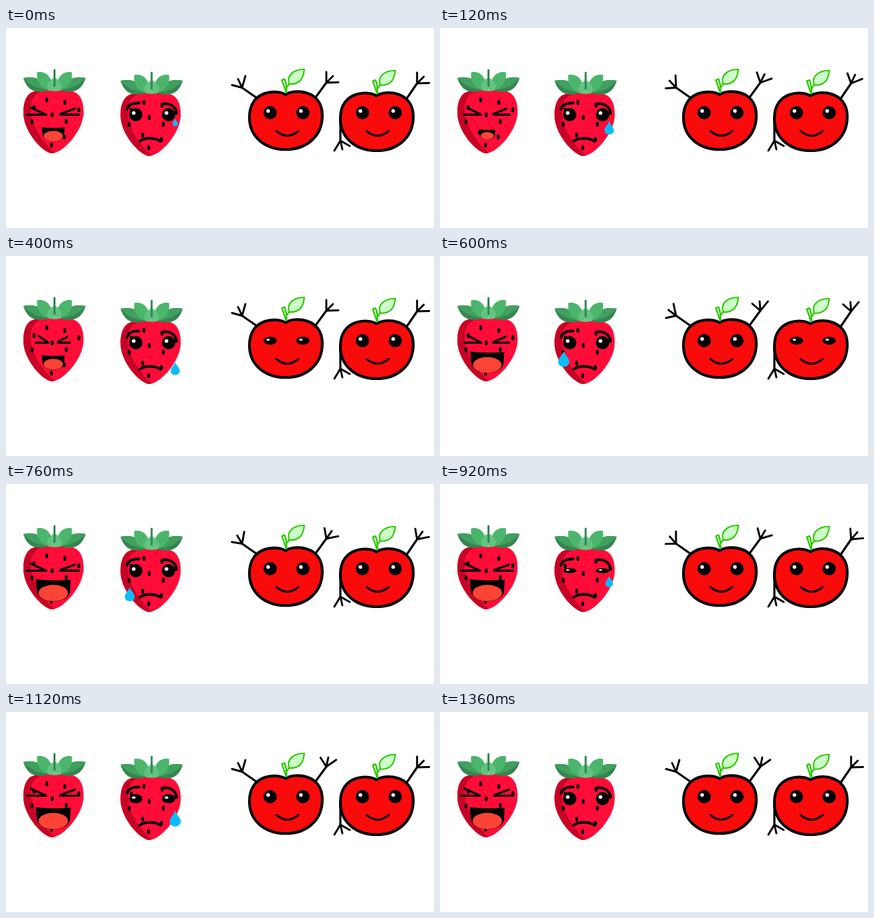
Animation of 640 by 300 pixels, one loop 1.4 s. Source, as an HTML page with a canvas:

```html
<!DOCTYPE html>
<html lang="en">
<head>
<meta charset="utf-8">
<title>Fruit faces</title>
<style>
html, body { margin: 0; width: 100%; height: 100%; overflow: hidden; background: #fff; }
canvas { display: block; }
</style>
</head>
<body>
<canvas id="stage" width="640" height="300"></canvas>
<script>
const ctx = document.getElementById('stage').getContext('2d');
const LOOP = 1400, STEP = 40;
ctx.lineCap = ctx.lineJoin = 'round';

// Rises from 0 to 1 between two times.
const ramp = (t, from, to) => Math.min(1, Math.max(0, (t - from) / (to - from)));
// Rises to 1 at the peak and falls back to 0.
const pulse = (t, peak, half) => Math.max(0, 1 - Math.abs(t - peak) / half);
// Three swings of a hand, in degrees.
const swing = (t, first, second, third) =>
  -first * pulse(t, 200, 200) - second * pulse(t, 600, 200) - third * pulse(t, 960, 160);
const blink = (t, peak) => 1 - .6 * pulse(t, peak, 120);

function at(x, y, draw, sx = 1, sy = sx, degrees = 0) {
  ctx.save();
  ctx.translate(x, y);
  ctx.rotate(degrees * Math.PI / 180);
  ctx.scale(sx, sy);
  draw();
  ctx.restore();
}

function shape(d, fill, stroke, width) {
  const path = new Path2D(d);
  if (fill) { ctx.fillStyle = fill; ctx.fill(path); }
  if (stroke) { ctx.strokeStyle = stroke; ctx.lineWidth = width; ctx.stroke(path); }
}
const line = (d, width, color = '#000') => shape(d, null, color, width);

function oval(x, y, rx, ry, fill) {
  ctx.fillStyle = fill;
  ctx.beginPath();
  ctx.ellipse(x, y, rx, ry, 0, 0, 7);
  ctx.fill();
}

function eyes(xs, y, open) {
  for (const x of xs) at(x, y, () => {
    oval(0, 0, 10, 10, '#000');
    oval(-3, -2.5, 2.7, 2.7, '#fff');
  }, 1, open);
}

// One half of the crown, with the stem at x = 0.
function leaves() {
  shape('M-46.5 75C-30 72 -18 76 -6 93C-20 97 -39 100 -46.5 75Z', '#35854f');
  shape('M-46.5 75C-30 72 -18 76 -6 93C-24 92 -36 87 -46.5 75Z', '#419f60');
  shape('M-26 66.5C-13 64 -4 72 -1 94C-17 93 -28 84 -26 66.5Z', '#4bb56b');
  shape('M0 74C-9 79 -15 88 -8 94L0 95Z', '#62c381');
}

function strawberry() {
  shape('M71 94H50C32 94 26 108 26 127C26 156 56 188 69 188C84 188 116 155 116 126C116 104 107 94 92 94Z', '#ff0d38');
  shape('M58 94H50C32 94 26 108 26 127C26 156 56 188 69 188L73 187C62 179 37 150 37 122C37 106 43 97 58 94Z', '#c70425');
  for (const side of [1, -1]) at(72.5, 0, leaves, side, 1);
  line('M72.5 63V87', 3, '#2e8a4e');
  line('M61 106v3.5m27 .5v3.5m-46 4v3.5m67 0v3.5m-40 4v3.5m-30 7v3.5m51 -4v3.5m-31 13v3.5m28 3v3.5m-19 9v3.5', 4.2);
}

function laughingFace(t) {
  const spread = 1 - .36 * pulse(t, 370, 370);
  const inset = 11 * (1 - spread);
  const eyeY = 130 - 4.5 * ramp(t, 920, 1120);
  at(60 + inset, eyeY, () => line('M-23 -10.5L0 0M-29 0H0', 3.2), spread, 1);
  at(81 - inset, eyeY, () => line('M22 -9L0 -1M0 0H28', 3.2), spread, 1);

  const size = .65 - .33 * pulse(t, 200, 200) + .35 * ramp(t, 400, 620);
  at(70.7, 160, () => {
    shape('M-26.5 -17Q0 -14.5 26 -16.5L25 2C23 11 12 16 0 16C-12 16 -23 11 -24.5 0Z', '#000');
    oval(0, 3.5, 22, 12.3, '#fb4435');
  }, size);
}

function tear(x, age) {
  if (age <= 0 || age >= 470) return;
  const size = Math.min(1, .45 + age / 330, 1.4 - age / 700);
  at(x, 141 + .068 * age, () =>
    shape('M0 -12C2 -6 8.3 -1 8.3 4C8.3 8.5 5 11.7 0 11.7C-5 11.7 -8.3 8.5 -8.3 4C-8.3 -1 -2 -6 0 -12Z', '#0bbcff'), size);
}

function cryingFace(t) {
  eyes([194, 243], 130, 1 - .85 * pulse(t, 980, 220));
  line('M181 122C183 115 190 112 199 112.5M234 114C244 112 254 117 255 128', 4);
  line('M200 170C207 164 223 164 231 170L233 167', 3.8);
  tear(253, t + 10);
  tear(185, t - 400);
  tear(253, t - 840);
}

function arm(x, y, shoulder, fingers, degrees = 0) {
  line(`M${shoulder}L${x} ${y}`, 3.2);
  at(x, y, () => line(fingers, 2.9), 1, 1, degrees);
}
const LEFT_HAND = 'M-15 -4L0 0L-6 -13M0 0L5 -17.5';
const RIGHT_HAND = 'M0 -16V0L10 -10M0 0L18 -.5';
const LOW_HAND = 'M-9 15L0 0L3 13M0 0L14 8';

function apple() {
  shape('M418 100C406 92 364 92 364 134C364 164 388 182.3 418 182.3C449 182.3 473 163 473 131C473 92 430 91 418 100Z',
    '#fa0b0b', '#000', 4.1);
  shape('M419 97L412.5 78L416.5 76.5Q420 84 419.5 97Z', '#ccffc0', '#2cc800', 2.3);
  shape('M446 62C430 62 419 71 423.5 84C437 85 445 78 446 62Z', '#ccffc8', '#2cc800', 2.1);
  line('M423.5 84L419.5 89', 2.2, '#2cc800');
}

const smile = x => line(`M${x - 16.5} 154.5Q${x} 168.5 ${x + 16.5} 154.5`, 3);

function draw(t) {
  ctx.fillStyle = '#fff';
  ctx.fillRect(0, 0, 640, 300);

  strawberry();
  laughingFace(t);
  at(145.3, 4, strawberry);
  cryingFace(t);

  arm(353, 89.5, '378 107', LEFT_HAND, swing(t, 31, 28, 22));
  arm(479, 82, '460 108', RIGHT_HAND, swing(t, 31, 49, 0) - 33 * ramp(t, 760, 1120));
  arm(614.7, 83, '597 109', RIGHT_HAND, swing(t, 33, 49, 5));

  apple();
  eyes([395, 444], 127, blink(t, 440));
  smile(420.7);

  at(136, 1.7, apple);
  eyes([533, 582], 127, blink(t, 640));
  smile(555.7);
  arm(500, 169, '500 135', LOW_HAND);
}

function tick(now) {
  draw(Math.floor(now % LOOP / STEP) * STEP);
  requestAnimationFrame(tick);
}
tick(performance.now());
</script>
</body>
</html>
```
